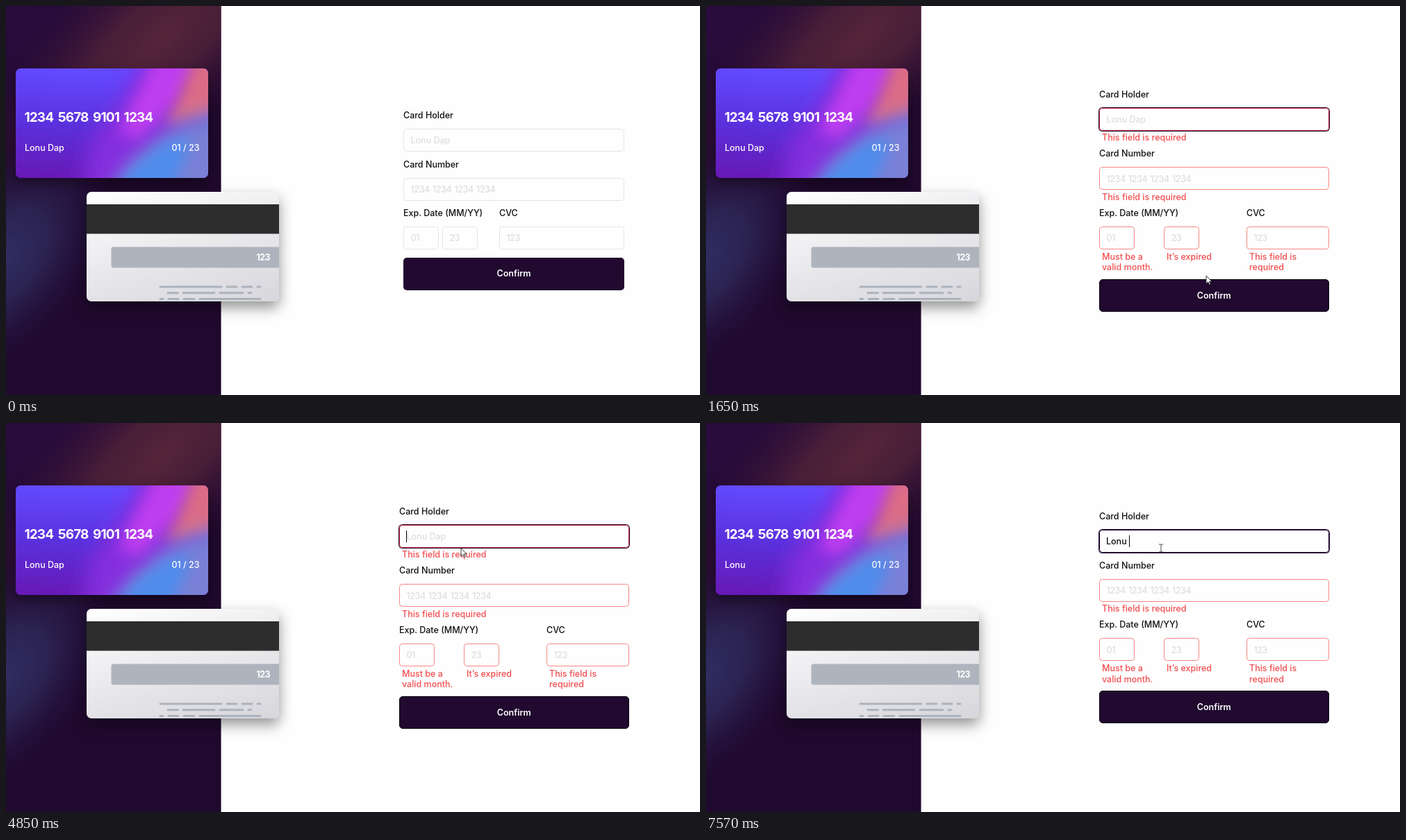
These frames come from a looping animation (999 px wide and 561 px high, 8000 ms). An HTML page:

```html
<!DOCTYPE html>
<html lang="en">
<head>
<meta charset="utf-8">
<title>Card form</title>
<style>
  html, body { margin: 0; width: 100%; height: 100%; overflow: hidden; background: #fefefe; }
  body { font: 500 12.5px/20px Inter, "Open Sans", sans-serif; color: #111; }
  #stage { position: relative; width: 999px; height: 561px; overflow: hidden; }
  #stage div, #stage svg { position: absolute; box-sizing: border-box; }
  .text { white-space: pre; }
  .panel { left: 0; top: 0; }
  .card { width: 277px; height: 158px; border-radius: 7px; overflow: hidden; }
  .front { left: 14px; top: 90px; box-shadow: 0 8px 18px rgba(0,0,0,.4); color: #fff; }
  .back { left: 116px; top: 268px; background: linear-gradient(165deg, #fff, #f0f0f2 35%, #d6d6dc);
    box-shadow: 0 9px 20px rgba(0,0,0,.42); }
  .number { font-size: 19px; font-weight: 700; letter-spacing: -.9px; word-spacing: 3px; }
  .cvc { font-weight: 700; letter-spacing: -.6px; color: #fff; }
  .field { border: 1px solid #e4e3e8; border-radius: 4.5px; }
  .field.bad { border-color: #f98583; }
  .field.focus { border-color: #21092f; box-shadow: 0 0 0 1px #21092f; }
  .field.focus.bad { border-color: #c5283c; }
  .hint { color: #dedde1; }
  .digits { letter-spacing: -.4px; word-spacing: 1.2px; }
  .error { color: #f24e50; }
  .button { background: #21092f; border-radius: 5px; color: #fff; font-weight: 600; text-align: center; line-height: 46px; }
  .button.ring { box-shadow: 0 0 0 2px #fff, 0 0 0 4px #21092f; }
  .button.edge { border: 1px solid #08020c; line-height: 45px; }
  #caret { width: 1px; height: 17px; background: #000; }
  #osd { left: 422px; top: 360.5px; width: 195px; height: 150px; border-radius: 12px; background: rgba(0,0,0,.5); }
  #osdText { left: 0; width: 195px; top: 116px; text-align: center; color: #f2f2f2;
    font: 400 15px/20px "Open Sans", "Noto Sans", sans-serif; }
  #cursor { left: 0; top: 0; overflow: visible; }
</style>
</head>
<body>
<div id="stage">
  <svg class="panel" width="310" height="561">
    <defs>
      <linearGradient id="night" gradientUnits="userSpaceOnUse" x1="0" y1="0" x2="130" y2="170">
        <stop offset="0" stop-color="#2a0c3e"/><stop offset="1" stop-color="#20092e"/>
      </linearGradient>
      <radialGradient id="rust" gradientUnits="userSpaceOnUse" cx="0" cy="0" r="1"
        gradientTransform="translate(225 45) rotate(-42) scale(340 135)">
        <stop offset="0" stop-color="#56253a"/><stop offset=".4" stop-color="#4e2139" stop-opacity=".85"/>
        <stop offset="1" stop-color="#3c143c" stop-opacity="0"/>
      </radialGradient>
      <radialGradient id="dusk" gradientUnits="userSpaceOnUse" cx="0" cy="0" r="1"
        gradientTransform="translate(-5 365) rotate(-50) scale(210 125)">
        <stop offset="0" stop-color="#312e64"/><stop offset=".4" stop-color="#2d2757" stop-opacity=".85"/>
        <stop offset="1" stop-color="#241040" stop-opacity="0"/>
      </radialGradient>
    </defs>
    <g>
      <rect width="309.6" height="561" fill="url(#night)"/>
      <rect width="309.6" height="561" fill="url(#rust)"/>
      <rect width="309.6" height="561" fill="url(#dusk)"/>
    </g>
  </svg>

  <div class="card front">
    <svg width="277" height="159">
      <defs>
        <linearGradient id="base" x1=".1" y1="0" x2="0" y2="1">
          <stop offset="0" stop-color="#634aff"/><stop offset=".5" stop-color="#5a30dc"/><stop offset="1" stop-color="#6818b4"/>
        </linearGradient>
        <filter id="soft" filterUnits="userSpaceOnUse" x="-60" y="-80" width="420" height="330"><feGaussianBlur stdDeviation="15"/></filter>
        <filter id="fine" filterUnits="userSpaceOnUse" x="-60" y="-80" width="420" height="330"><feGaussianBlur stdDeviation="10"/></filter>
      </defs>
      <rect width="277" height="159" fill="url(#base)"/>
      <path d="M190-30H330L250 90L180 200L90 190L110 100L150 50Z" fill="#852fde" filter="url(#soft)"/>
      <path d="M208-30H275L235 45L180 100L148 95L165 55Z" fill="#bd3df0" filter="url(#fine)"/>
      <path d="M262-30H330V62L250 78L215 82L232 48Z" fill="#dc6c86" filter="url(#fine)"/>
      <path d="M235 78L330 50V220H110L165 135Z" fill="#7a80d6" filter="url(#soft)"/>
      <path d="M170 140L215 105L255 100L235 150L215 200H120Z" fill="#4f8cec" filter="url(#fine)"/>
    </svg>
    <div class="text number" style="left:12.5px;top:60.5px">1234 5678 9101 1234</div>
    <div class="text" id="holder" style="left:13px;top:105px"></div>
    <div class="text" style="right:12.5px;top:105px">01 / 23</div>
  </div>

  <div class="card back">
    <svg width="277" height="159">
      <rect y="18" width="277" height="42.5" fill="#2d2d2d"/>
      <rect x="35.5" y="79.5" width="250" height="30" rx="3" fill="#adb4bd"/>
      <g stroke="#adb3bb" stroke-width="3" stroke-linecap="round" fill="none">
        <path d="M106 137h88M202 137h14M224 137h14M246 137h4"/>
        <path d="M117 145.700h14.500M139 145.700h45M192 145.700h33M233 145.700h4"/>
        <path d="M106 154.500h4M118 154.500h14M140 154.500h15M163 154.500h87"/>
      </g>
    </svg>
    <div class="text cvc" style="right:13px;top:85px">123</div>
  </div>

  <div id="form"></div>
  <div id="caret"></div>
  <div id="osd">
    <svg width="195" height="150" fill="none" stroke="#fff">
      <rect x="78.500" y="45" width="39" height="39" rx="3" stroke-width="3.500"/>
      <path d="M86.500 77.500L101.500 52.500H105L109.500 77.500M92.500 70H107.500" stroke-width="5"/>
    </svg>
    <div id="osdText" class="text"></div>
  </div>
  <svg id="cursor" width="1" height="1">
    <path id="arrow" d="M0 0V11.500L2.700 9L4.500 13L6.200 12.200L4.500 8.400H8Z" fill="#fff" stroke="#222" stroke-width=".9"/>
    <path id="beam" d="M-3-5.500H-.8L0-4.800L.8-5.500H3M0-5V5M-3 5.500H-.8L0 4.800L.8 5.500H3" fill="none" stroke="#444"/>
    <path id="hand" d="M-1.300 1Q0-1 1.300 1V5.500Q3 4.500 3.800 6Q5.500 5.200 6 6.700Q7.700 6.300 7.700 8.500V11L6.300 15H-.5L-4 9.500Q-4.500 7.500-2.700 8.200L-1.300 9.500Z" fill="#fff" stroke="#1a0a22" stroke-width=".8"/>
  </svg>
</div>

<script>
const LOOP = 8000, NAME = 'Lonu Dap';
const $ = id => document.getElementById(id);

const ERRORS_AT = 1610, TYPE_AT = 5270;
const TYPE_TIMES = [5270, 5520, 5760, 5870, 7570];
const CARET_FLIPS = [1690, 2210, 2740, 3260, 3810, 4330, 4850, 6390, 6910, 7500, 7570];
const OSD = { show: 5130, swap: 5380, fade: 6180, gone: 6950 };

// time, x, y, exponent of the ease-out leading to the point
const PATH = [
  [30, 942, -8, 1], [810, 718, 395, 2], [1330, 718, 395, 1], [1370, 720, 389, 1],
  [2070, 720, 389, 1], [2210, 691, 235, 1.3], [2780, 655, 180.5, 2.5]
];

// left edge, width, and y of each row for the three layouts
const LAYOUTS = {
  clean: { x: 572, w: 318, rows: [157.5, 228.5, 298.5], yearX: 628, cvcX: 710, button: 363 },
  errors: { x: 566, w: 330.5, rows: [127.5, 213, 298.5], yearX: 659, cvcX: 778, button: 394 },
  typing: { x: 566, w: 330.5, rows: [135, 205.5, 291], yearX: 659, cvcX: 778, button: 386 }
};
const FIELD = { top: 19, h: 33, short: 51 }, BUTTON_H = 47;

const text = (x, y, str, cls = '') =>
  `<div class="text ${cls}" style="left:${x}px;top:${y - 10}px">${str}</div>`;
const box = (x, y, w, h, cls, body = '') =>
  `<div class="${cls}" style="left:${x}px;top:${y}px;width:${w}px;height:${h}px">${body}</div>`;

function formHtml(mode, typed, ring) {
  const { x, w, rows: [a, b, c], yearX, cvcX, button } = LAYOUTS[mode];
  const right = x + w, clean = mode === 'clean', bad = clean ? '' : ' bad';
  const field = (fx, y, fw, hint, cls, hintCls) =>
    box(fx, y + FIELD.top, fw, FIELD.h, 'field' + cls) +
    (hint && text(fx + 10.5, y + 36.5, hint, 'hint ' + hintCls));
  let html = text(x, a, 'Card Holder') + text(x, b, 'Card Number') +
    text(x, c, 'Exp. Date (MM/YY)') + text(cvcX, c, 'CVC') +
    field(x, a, w, typed ? '' : NAME, clean ? '' : typed ? ' focus' : ' focus bad', '') +
    field(x, b, w, '1234 1234 1234 1234', bad, 'digits') +
    field(x, c, FIELD.short, '01', bad, 'digits') + field(yearX, c, FIELD.short, '23', bad, 'digits') +
    field(cvcX, c, right - cvcX, '123', bad, 'digits');
  if (typed) html += `<div id="typed" class="text" style="left:${x + 10}px;top:${a + 26}px">${typed}</div>`;
  if (!clean) {
    const error = (ex, y, str) => text(ex + 4, y, str, 'error');
    if (!typed) html += error(x, a + 62.5, 'This field is required');
    html += error(x, b + 62.5, 'This field is required') +
      error(x, c + 63, 'Must be a') + error(x, c + 78.5, 'valid month.') +
      error(yearX, c + 63, 'It’s expired') +
      error(cvcX, c + 63, 'This field is') + error(cvcX, c + 78.5, 'required');
  }
  return html + box(x, button, w, BUTTON_H, 'button' + (clean ? '' : ' edge') + (ring ? ' ring' : ''), 'Confirm');
}

function cursorAt(t) {
  const i = PATH.findIndex(p => p[0] > t);
  if (i < 0) return PATH[PATH.length - 1].slice(1, 3);
  if (i === 0) return [-50, -50];
  const [t0, x0, y0] = PATH[i - 1], [t1, x1, y1, power] = PATH[i];
  const k = 1 - (1 - (t - t0) / (t1 - t0)) ** power;
  return [x0 + (x1 - x0) * k, y0 + (y1 - y0) * k];
}

function cursorKind(mode, x, y) {
  const { x: left, w, rows, yearX, cvcX, button } = LAYOUTS[mode];
  if (x < left || x > left + w) return 'arrow';
  if (y >= button && y <= button + BUTTON_H) return 'hand';
  const row = rows.findIndex(r => y > r + FIELD.top && y < r + FIELD.top + FIELD.h);
  const inGap = row === 2 &&
    ((x > left + FIELD.short && x < yearX) || (x > yearX + FIELD.short && x < cvcX));
  return row >= 0 && !inGap ? 'beam' : 'arrow';
}

let lastKey, caretX;

function render(t) {
  const mode = t < ERRORS_AT ? 'clean' : t < TYPE_AT ? 'errors' : 'typing';
  const typed = (NAME + ' ').slice(0, TYPE_TIMES.filter(at => at <= t).length);
  const [x, y] = cursorAt(t), kind = cursorKind(mode, x, y);
  const ring = mode === 'clean' && kind === 'hand';

  const key = [mode, typed, ring].join();
  if (key !== lastKey) {
    lastKey = key;
    $('form').innerHTML = formHtml(mode, typed, ring);
    $('holder').textContent = typed || NAME;
    const input = $('typed');
    caretX = 576 + (input ? input.getBoundingClientRect().width : 0);
  }

  const caret = $('caret').style;
  caret.visibility = CARET_FLIPS.filter(at => at <= t).length % 2 ? 'visible' : 'hidden';
  caret.left = Math.round(caretX) + 'px';
  caret.top = (mode === 'typing' ? 162 : 155) + 'px';

  const fade = Math.min(1, Math.max(0, (t - OSD.fade) / (OSD.gone - OSD.fade)));
  $('osd').style.opacity = t < OSD.show ? 0 : 1 - fade;
  $('osdText').textContent = t < OSD.swap ? 'Caps Lock ativada' : 'Caps Lock desativada';

  $('cursor').style.transform = `translate(${x}px,${y}px)`;
  for (const id of ['arrow', 'beam', 'hand']) $(id).style.display = id === kind ? '' : 'none';
}

const start = performance.now();
function tick() {
  render((performance.now() - start) % LOOP);
  requestAnimationFrame(tick);
}
tick();
</script>
</body>
</html>
```
